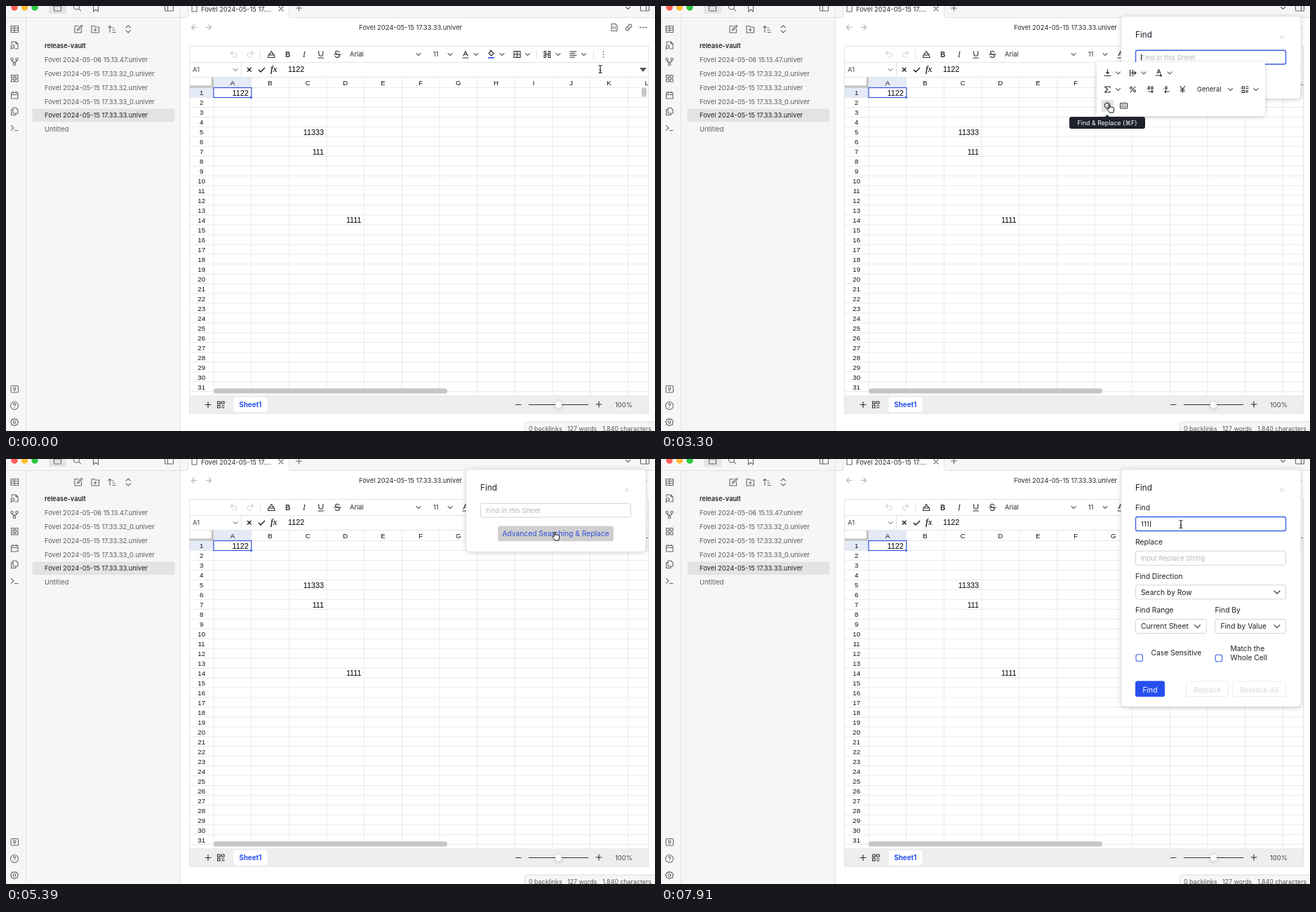
Write an HTML page that moves like this. It is 925 px wide and 606 px high and loops after 8000 ms.

```html
<!DOCTYPE html>
<html lang="en">
<head>
<meta charset="utf-8">
<title>Spreadsheet find and replace</title>
<style>
html, body { margin: 0; width: 100%; height: 100%; overflow: hidden; background: #fff; }
svg { display: block; width: 100%; height: 100%; }
text { font: 9.4px Inter, sans-serif; fill: #2b2b2b; white-space: pre; }
.files text { fill: #5c5c5c; }
.files .on { fill: #222; }
.status text { font-size: 8.9px; fill: #555; }
.sheet text { font: 9.6px "Liberation Sans", Arial, sans-serif; fill: #111; text-anchor: middle; }
.sheet .cell, .formula { font: 10.78px "Liberation Sans", Arial, sans-serif; fill: #000; }
.sheet .cell { text-anchor: end; }
.dialog text { font-size: 10.3px; fill: #1e222b; }
.dialog .title { font-size: 11.76px; }
.dialog .hint, .dialog .typed { font-size: 9.56px; }
.dialog .hint { fill: #b6b8bd; }
.dialog .link { fill: #2f52dc; }
.dialog .off { fill: #dadada; }
.tip text { font-size: 8.82px; fill: #fff; text-anchor: middle; }
.i { fill: none; stroke: #666; stroke-width: 1.1; stroke-linecap: round; stroke-linejoin: round; }
.k { stroke: #2b2b2b; }
.pale { stroke: #c8c8c8; }
.dim { stroke: #d4d4d4; }
.line { fill: none; stroke: #e2e2e2; }
.box { fill: #fff; stroke: #d3d4d8; }
.focus { fill: none; stroke: #3d62ea; stroke-width: 1.4; }
.shadow { filter: drop-shadow(0 1px 3px #0003); }

/* All states hold until the next key; one loop is 8 s. */
.a { animation: 8s step-end infinite; }
#cursor { animation-name: move; }
#hand { animation-name: hand; }
#beam { animation-name: beam; }
#more { animation-name: more; }
#moreTip { animation-name: moreTip; }
#panel { animation-name: panel; }
#findHover { animation-name: findHover; }
#findTip { animation-name: findTip; }
#small { animation-name: small; }
#smallFocus { animation-name: smallFocus; }
#smallCaret { animation-name: smallCaret; }
#linkHover { animation-name: linkHover; }
#full { animation-name: full; }
#fullFocus { animation-name: fullFocus; }
#fullCaret { animation-name: fullCaret; }
#hint { animation-name: hint; }
#ready { animation-name: ready; }
#one { animation-name: one; }
#two { animation-name: two; }
#three { animation-name: ready3; }
@keyframes move {
  0% { transform: translate(847px, 90px); }
  1.87% { transform: translate(872px, 92px); }
  3.75% { transform: translate(885px, 94px); }
  9.37% { transform: translate(881px, 92px); }
  11.25% { transform: translate(873px, 86px); }
  13.12% { transform: translate(864px, 79px); }
  15% { transform: translate(858px, 73px); }
  16.87% { transform: translate(856px, 71.5px); }
  26.25% { transform: translate(846px, 80px); }
  28.12% { transform: translate(812px, 97px); }
  30% { transform: translate(762px, 117px); }
  31.87% { transform: translate(708px, 132px); }
  33.75% { transform: translate(668px, 141px); }
  35.62% { transform: translate(645px, 145px); }
  37.5% { transform: translate(641px, 146px); }
  46.87% { transform: translate(650px, 138px); }
  48.75% { transform: translate(680px, 115px); }
  50.62% { transform: translate(718px, 88px); }
  52.5% { transform: translate(748px, 70px); }
  54.37% { transform: translate(764px, 60px); }
  56.25% { transform: translate(769px, 57px); }
  61.75% { transform: translate(771px, 62px); }
  63.62% { transform: translate(775px, 74px); }
  65.5% { transform: translate(780px, 94px); }
  67.37%, 72.87% { transform: translate(784px, 110px); }
  76.62% { transform: translate(772px, 106px); }
  78.5% { transform: translate(752px, 97px); }
  80.37%, 100% { transform: translate(741px, 93px); }
}
@keyframes hand { 0% { opacity: 0; } 13.12% { opacity: 1; } 63.62% { opacity: 0; } 65.5% { opacity: 1; } 78.5%, 100% { opacity: 0; } }
@keyframes beam { 0% { opacity: 1; } 13.12% { opacity: 0; } 63.62% { opacity: 1; } 65.5% { opacity: 0; } 78.5%, 100% { opacity: 1; } }
@keyframes more { 0% { opacity: 0; } 15% { opacity: 1; } 28.12%, 100% { opacity: 0; } }
@keyframes moreTip { 0% { opacity: 0; } 16.87% { opacity: 1; } 28.12%, 100% { opacity: 0; } }
@keyframes panel { 0% { opacity: 0; } 20.62% { opacity: .6; } 22.5% { opacity: 1; } 56.25% { opacity: .4; } 58%, 100% { opacity: 0; } }
@keyframes findHover { 0% { opacity: 0; } 35.62% { opacity: 1; } 48.75%, 100% { opacity: 0; } }
@keyframes findTip { 0% { opacity: 0; } 37.5% { opacity: 1; } 48.75%, 100% { opacity: 0; } }
@keyframes small { 0% { opacity: 0; } 39.37% { opacity: .6; } 41.25% { opacity: 1; } 71.12%, 100% { opacity: 0; } }
@keyframes smallFocus { 0% { opacity: 1; } 56.25% { opacity: 0; } 63.62% { opacity: 1; } 65.5%, 100% { opacity: 0; } }
@keyframes smallCaret { 0% { opacity: 1; } 46.87% { opacity: 0; } 52.5% { opacity: 1; } 56.25%, 100% { opacity: 0; } }
@keyframes linkHover { 0% { opacity: 0; } 67.37%, 100% { opacity: 1; } }
@keyframes full { 0% { opacity: 0; } 71.12%, 100% { opacity: 1; } }
@keyframes fullFocus { 0% { opacity: 0; } 72.87%, 100% { opacity: 1; } }
@keyframes fullCaret { 0% { opacity: 0; } 72.87% { opacity: 1; } 78.5% { opacity: 0; } 84% { opacity: 1; } 89.62%, 100% { opacity: 0; } }
@keyframes hint { 0% { opacity: 1; } 95.12%, 100% { opacity: 0; } }
@keyframes ready { 0% { opacity: 0; } 95.12%, 100% { opacity: 1; } }
@keyframes one { 0% { opacity: 0; } 95.12% { opacity: 1; } 97%, 100% { opacity: 0; } }
@keyframes two { 0% { opacity: 0; } 97% { opacity: 1; } 98.87%, 100% { opacity: 0; } }
@keyframes ready3 { 0% { opacity: 0; } 98.87%, 100% { opacity: 1; } }
</style>
</head>
<body>
<svg viewBox="0 0 925 606">
<defs>
  <path id="chev" class="i" d="M-3-1.5 0 1.5 3-1.5"/>
  <path id="chevDark" class="i k" stroke-width="1.3" d="M-4-2 0 2 4-2"/>
  <path id="x" class="i" d="M-3-3 3 3M3-3-3 3"/>
  <path id="plus" class="i k" d="M-4 0H4M0-4V4"/>
  <clipPath id="grid"><rect x="262" y="101" width="653" height="454"/></clipPath>
</defs>

<!-- app frame -->
<rect width="925" height="606" fill="#fff"/>
<rect width="249" height="606" fill="#f6f6f6"/>
<rect x="249" width="676" height="16.5" fill="#f6f6f6"/>
<path class="line" d="M0 16.5H257M28.5 17V606M248.5 0V606M406 16.5H925"/>
<path d="M257 16.5q3 0 3-4V-2H403.500V12.500q0 4 3 4V17H257z" fill="#fff"/>
<path class="line" d="M257 16.500q3 0 3-4V-2M403.500-2V12.500q0 4 3 4"/>
<circle cx="12" cy="2" r="4.700" fill="#ff5f57"/>
<circle cx="26.500" cy="2" r="4.700" fill="#febc2e"/>
<circle cx="41" cy="2" r="4.700" fill="#28c840"/>
<rect x="61" y="-8" width="25" height="19" rx="3" fill="#e4e4e4"/>
<path class="i" d="M68.500-2V6q0 1 1 1h8q1 0 1-1V0H68.500M101-2m-4.500 3a4 4 0 1 0 8 0 4 4 0 1 0-8 0M104 4l2.500 3M124.500-2V8l3.500-3 3.500 3V-2M226.500-2V6q0 1 1 1h10q1 0 1-1V-2M230.500-2V7M904.500-2V6q0 1 1 1h10q1 0 1-1V-2M912.500-2V7M265-2V8h7V0l-2-2"/>
<use href="#chev" x="886.500" y="3"/>
<use href="#x" x="392" y="4"/>
<path class="i" d="M413.500 3h8M417.500-1V7"/>
<text x="278" y="7.500">Fovel 2024-05-15 17....</text>

<!-- ribbon -->
<g class="i">
  <path d="M7 28.500h10.500v9H7zM7 31.500h10.500M7 34.500h10.500M12 28.500v9"/>
  <path d="M8 54v-3h6l3 3v7h-4M14 51v3h3"/><circle cx="9.500" cy="58" r="2.300"/><path d="M8 60l-1.500 2"/>
  <circle cx="8.500" cy="76" r="1.700"/><circle cx="15.500" cy="76" r="1.700"/><circle cx="12" cy="83" r="1.700"/><path d="M8.500 78q0 2 3.500 2t3.500-2M12 80v1"/>
  <path d="M7.500 98.500h3.800v3.800H7.500zM13.200 98.500H17v3.800h-3.800zM7.500 104.200h3.800V108H7.500zM13.200 104.200H17V108h-3.800z"/>
  <path d="M7.500 123.500h9.500v8.500H7.500zM7.500 126.500H17M10 121.800v2.500M14.500 121.800v2.500"/>
  <path d="M10 145h4l3 3v5h-7zM10 147.500H7.500v8H14v-2.500"/>
  <path d="M7.500 170.500l3.500 3.300-3.500 3.300M12.500 177.500H17"/>
  <rect x="7" y="541.500" width="10.500" height="9.500" rx="1.500"/><circle cx="12.200" cy="545.500" r="1.700"/><path d="M12.200 547.500v1.500"/>
  <circle cx="12" cy="570" r="5.500"/><path d="M10.300 568.500q.3-1.700 1.900-1.600 1.700.3 1.400 1.800-.2.900-1.600 1.600M12 572.600v.2"/>
  <circle cx="12" cy="593.500" r="1.800"/><path d="M12 588l1.300 1.700 2.300-.6.500 2.200 1.600 1.600-1.200 1.800.1 2.200-2.400.4-2.200 1.500-2-1.500-2.500-.4.100-2.200-1.300-1.700 1.700-1.700.5-2.200 2.200.6z"/>
</g>

<!-- file list -->
<g class="i">
  <path d="M103 28.500h-5v9.500h9.500v-5M101.500 34.800l.4-2 5.500-5.500 1.500 1.500-5.500 5.500z"/>
  <path d="M122 28.500h4l1.200 1.500h5.300v8H122zM127.200 32v4M125.200 34h4"/>
  <path d="M148 37.500v-9M146 30.500l2-2 2 2M152 31h1.500M152 34.200h3M152 37.500h4.500"/>
  <path d="M171 31l3.200-3.200L177.400 31M171 34.800l3.200 3.200 3.200-3.200"/>
</g>
<rect x="37.500" y="146.500" width="203" height="18.800" rx="3" fill="#e3e3e3"/>
<g class="files">
  <text class="on" x="55" y="60.400" font-weight="600" style="font-weight:600;font-size:9.200px">release-vault</text>
  <text x="55" y="80.200">Fovel 2024-05-06 15.13.47.univer</text>
  <text x="55" y="100">Fovel 2024-05-15 17.33.32_0.univer</text>
  <text x="55" y="119.800">Fovel 2024-05-15 17.33.32.univer</text>
  <text x="55" y="139.500">Fovel 2024-05-15 17.33.33_0.univer</text>
  <text class="on" x="55" y="159.300">Fovel 2024-05-15 17.33.33.univer</text>
  <text x="55" y="179">Untitled</text>
</g>

<!-- view header -->
<path class="i" style="stroke:#b4b4b4" d="M272 30.500h-7.500M268 27l-3.500 3.500L268 34M285 30.500h7.500M289 27l3.500 3.500L289 34"/>
<text x="503" y="34">Fovel 2024-05-15 17.33.33.univer</text>
<g class="i">
  <path d="M863 25.500h5.500l2.500 2.500v7.500h-8zM866 29.500l-1.300 1.500 1.300 1.500M868 29.500l1.300 1.500-1.300 1.500"/>
  <path d="M886.500 31.500q1.500 1.500 3 0l2-2q1-2-.5-3t-3 0l-1 1M888.500 29.500q-1.500-1.500-3 0l-2 2q-1 2 .5 3t3 0l1-1"/>
</g>
<path d="M904 30.500h.1M908 30.500h.1M912 30.500h.1" stroke="#555" stroke-width="2" stroke-linecap="round"/>

<!-- toolbar -->
<path class="line" d="M261.500 582V57.500H915.500M261.500 80.500H915.500M261.500 101.500H915.500M335.500 81V101M362.500 63V75M756.500 63V75M837.500 63V75"/>
<g class="i dim"><path d="M320.500 67h5.500q3 .5 3 3t-3 3h-3M323 64.500l-2.500 2.500 2.500 2.500M352.500 67H347q-3 .5-3 3t3 3h3M350 64.500l2.500 2.500-2.500 2.500"/></g>
<path class="i k" d="M374 70l-.5 3.500h9.500l-.5-3.500zM375 70v-2h2v-1.500q1.200-4 2.500 0V68h2v2"/>
<text x="398" y="72.800" style="font-size:11px;font-weight:600">B</text>
<text x="423" y="72.800" style="font:italic 11.500px 'Liberation Serif',serif">I</text>
<path class="i k" d="M445.800 64.500v4q.3 2.700 3 2.700t3-2.700v-4M445 74h7.500"/>
<path class="i k" d="M475 66q-1-1.800-2.800-1.700-2.700.2-2.700 2t2.500 2.300q3.300.5 3.300 2.600t-3 2.200q-2.400 0-3-1.800M467.500 69H477.500"/>
<text x="490" y="72.300">Arial</text><text x="608.800" y="72.300">11</text>
<use href="#chev" x="588" y="69"/><use href="#chev" x="633" y="69"/><use href="#chev" x="670" y="69"/><use href="#chev" x="707" y="69"/><use href="#chev" x="743.500" y="69"/><use href="#chev" x="787" y="69"/><use href="#chev" x="823.500" y="69"/>
<path class="i k" d="M652 71l3-6.500 3 6.500M653 69h4M651 74h8"/>
<path class="i k" d="M688 67.500l3.500-3.500 3.500 3.500-3.500 3.500zM691.500 64l-1.500-1"/><path d="M687 73.800h9" stroke="#274fee" stroke-width="1.600"/>
<path class="i k" d="M724 64.500h9v9h-9zM724 69h9M728.500 64.500v9M769.500 64.500h-2.500v3.500h2.500zM773 64.500h2.800v3.500H773zM767 70h2.500v3.500H767zM773 70h2.800v3.500H773zM769.500 69h3.500M804 65h9M804 67.700h6.500M804 70.300h9M804 73h6.500"/>
<path d="M851.500 65v.1M851.500 69v.1M851.500 73v.1" stroke="#333" stroke-width="1.600" stroke-linecap="round"/>
<g id="more" class="a" opacity="0">
  <rect x="843" y="60" width="18" height="18" rx="3" fill="#e4e4e4"/>
  <path d="M851.500 65v.1M851.500 69v.1M851.500 73v.1" stroke="#333" stroke-width="1.600" stroke-linecap="round"/>
</g>

<!-- formula bar -->
<text x="266" y="94.300" style="fill:#444">A1</text>
<use href="#chevDark" transform="translate(327 91) scale(.75)"/>
<path d="M344 88l5.500 5.500M349.500 88l-5.500 5.500M360 91l3 3 6-6" fill="none" stroke="#111" stroke-width="1.300"/>
<text x="377" y="94.300" style="font:italic 600 11.500px 'Liberation Serif',serif">fx</text>
<text class="formula" x="402" y="94.300">1122</text>
<path d="M903 88h10l-5 6z" fill="#555"/>

<!-- cells -->
<g class="sheet" clip-path="url(#grid)">
  <path d="M296 101.500h53.700V116H296zM262 116.500h33.800v14H262z" fill="#e4eaf6"/>
  <path id="lines" fill="none" stroke="#e4e5e8" stroke-width=".8"/>
  <path d="M292.800 102h3v14.500H262V113.500h30.800z" fill="#c2c2c2"/>
  <g id="heads"></g>
  <text class="cell" x="345.700" y="127.700">1122</text>
  <text class="cell" x="453" y="183.600">11333</text>
  <text class="cell" x="453" y="211.600">111</text>
  <text class="cell" x="506.500" y="309.400">1111</text>
  <rect x="295.900" y="116.500" width="53.900" height="14" fill="none" stroke="#3055dc" stroke-width="1.200"/>
  <rect x="347.500" y="128.500" width="3.500" height="3.500" fill="#3055dc" stroke="#fff" stroke-width=".5"/>
</g>
<rect x="296" y="545.300" width="333" height="7.200" rx="3.600" fill="#c6c6c6"/>
<rect x="906" y="116.500" width="7" height="13" rx="3.500" fill="#c6c6c6"/>
<path class="line" d="M915.500 57V582"/>

<!-- sheet bar -->
<rect x="262" y="555" width="653" height="27" fill="#eeeeef"/>
<use href="#plus" x="288" y="568.500"/>
<path class="i k" d="M301.500 564h3.500v3.500h-3.500zM301.500 569.500h3.500v3.500h-3.500zM307 564h4v3h-4zM307.500 570h3.500M307.500 572.800h3.500"/>
<rect x="324.500" y="558" width="48" height="21" rx="3" fill="#fff"/>
<text x="348.300" y="572" text-anchor="middle" style="font-size:9.800px;font-weight:700;fill:#274fee">Sheet1</text>
<path d="M726 568.500h8.500M745 568.500h85" stroke="#333"/>
<circle class="shadow" cx="787.500" cy="568.500" r="4.500" fill="#fff"/>
<use href="#plus" x="845" y="568"/>
<text x="868" y="571.500" style="fill:#444">100%</text>

<!-- status -->
<path d="M739.500 607V596q0-3 3-3H926V607z" fill="#f6f6f6" stroke="#dcdcdc"/>
<g class="status"><text x="745" y="606">0 backlinks</text><text x="800" y="606">127 words</text><text x="850" y="606">1,840 characters</text></g>

<!-- find dialog, short -->
<g id="small" class="dialog a" opacity="0">
  <rect class="shadow" x="656" y="15" width="256" height="117" rx="5" fill="#fff" stroke="#ececec"/>
  <text class="title" x="676" y="44.700">Find</text>
  <use href="#x" transform="translate(885 44) scale(.8)" opacity=".3"/>
  <rect class="box" x="676.500" y="63.300" width="214" height="19.700" rx="2.500"/>
  <rect id="smallFocus" class="focus a" x="676.500" y="63.300" width="214" height="19.700" rx="2.500"/>
  <text class="hint" x="684" y="76.600">Find in this Sheet</text>
  <path id="smallCaret" class="a" d="M684.500 68.500v9" stroke="#222"/>
  <rect id="linkHover" class="a" x="701" y="95.500" width="165" height="21.700" rx="3" fill="#cfcfcf" opacity="0"/>
  <text class="link" x="783.500" y="110.200" text-anchor="middle">Advanced Searching &amp; Replace</text>
</g>

<!-- find dialog, long -->
<g id="full" class="dialog a" opacity="0">
  <rect class="shadow" x="656" y="15" width="256" height="338" rx="5" fill="#fff" stroke="#ececec"/>
  <text class="title" x="676" y="44.700">Find</text>
  <use href="#x" transform="translate(885 44) scale(.8)" opacity=".3"/>
  <text x="676" y="73.300">Find</text>
  <text x="676" y="122">Replace</text>
  <text x="676" y="170.700">Find Direction</text>
  <text x="676" y="219.300">Find Range</text>
  <text x="789.500" y="219.300">Find By</text>
  <g class="box">
    <rect x="676.500" y="82.500" width="214" height="20" rx="2.500"/>
    <rect x="676.500" y="131.300" width="214" height="20" rx="2.500"/>
    <rect x="676.500" y="179.800" width="214" height="20" rx="2.500"/>
    <rect x="676.500" y="228.500" width="101" height="20" rx="2.500"/>
    <rect x="789.500" y="228.500" width="101" height="20" rx="2.500"/>
  </g>
  <rect id="fullFocus" class="focus a" x="676.500" y="82.500" width="214" height="20" rx="2.500"/>
  <text id="hint" class="hint a" x="684" y="96">Find in this Sheet</text>
  <path id="fullCaret" class="a" d="M684.500 88v8.500" stroke="#222"/>
  <g id="one" class="a"><text class="typed" x="684" y="96">1</text><path d="M688.700 88v9" stroke="#222"/></g>
  <g id="two" class="a"><text class="typed" x="684" y="96">11</text><path d="M693.200 88v9" stroke="#222"/></g>
  <g id="three" class="a"><text class="typed" x="684" y="96">111</text><path d="M697.700 88v9" stroke="#222"/></g>
  <text class="hint" x="684" y="144.700">Input Replace String</text>
  <text x="684" y="193.500">Search by Row</text>
  <text x="684" y="242.200">Current Sheet</text>
  <text x="797.500" y="242.200">Find by Value</text>
  <use href="#chevDark" x="878" y="190"/><use href="#chevDark" x="764.500" y="238.700"/><use href="#chevDark" x="878" y="238.700"/>
  <rect x="677" y="278.800" width="9.500" height="9.500" rx="2.300" class="focus" style="stroke-width:1.100"/>
  <rect x="790.200" y="279.300" width="9.500" height="9.500" rx="2.300" class="focus" style="stroke-width:1.100"/>
  <text x="698.500" y="279.500">Case Sensitive</text>
  <text x="811.500" y="273.700">Match the</text>
  <text x="811.500" y="287.300">Whole Cell</text>
  <g class="box" style="stroke:#ececec">
    <rect x="676.500" y="317" width="41" height="21.500" rx="2.500"/>
    <rect x="748.500" y="317" width="60" height="21.500" rx="2.500"/>
    <rect x="814.500" y="317" width="76" height="21.500" rx="2.500"/>
  </g>
  <g text-anchor="middle">
    <text class="off" x="697" y="332.500">Find</text>
    <text class="off" x="778.500" y="332.500">Replace</text>
    <text class="off" x="852.500" y="332.500">Replace All</text>
    <g id="ready" class="a">
      <rect x="676" y="316.500" width="42" height="22.500" rx="3" fill="#274fee"/>
      <text x="697" y="332.500" style="fill:#fff">Find</text>
    </g>
  </g>
</g>

<!-- overflow tools -->
<g id="panel" class="a" opacity="0">
  <rect class="shadow" x="621" y="80.500" width="240" height="76.500" rx="3" fill="#fff"/>
  <rect x="621" y="80" width="240" height="5" fill="#fff"/>
  <rect id="findHover" class="a" x="628" y="134" width="17" height="17" rx="3" fill="#e2e2e2"/>
  <g class="i k">
    <path d="M632 99.500h9M636.500 90.500v6M634.500 94.500l2 2 2-2"/>
    <path d="M668.500 91v9M672.500 91v9M670 95.500h7M675 93.500l2 2-2 2"/>
    <path d="M707 96l2.500-5.500L712 96M707.800 94.500h3.400M705.500 99h8M712 97.500l1.500 1.500-1.500 1.500"/>
    <path d="M640 116.500v-1.500h-7.500l4 4-4 4h7.500V121.500"/>
    <circle cx="670" cy="116.700" r="1.500"/><circle cx="675" cy="121.200" r="1.500"/><path d="M676 115l-7 8"/>
    <path d="M693 118h.1M694.500 115h2v3.500h-2zM699 115h2v3.500h-2zM695 122h6M699.500 120.500l1.500 1.500-1.500 1.500"/>
    <path d="M716.500 118h.1M719 115h2v3.500h-2zM724 122h-6M719.500 120.500L718 122l1.500 1.500"/>
    <path d="M740 114.500l3.300 4 3.300-4M743.300 118.500v5M740.300 119h6M740.300 121.300h6"/>
    <path d="M828 115h3.500v3H828zM828 120.500h3.500v3H828zM834 115h3M834 117.500h3M833.500 120.500l3 3M836.500 120.500l-3 3"/>
    <circle cx="636" cy="141.800" r="3.700"/><path d="M639 144.500l2 2"/>
    <rect x="654.500" y="138.500" width="10" height="7.500" rx="1"/><path d="M656.500 141h6M656.500 143.500h6" stroke-dasharray="1 1.300"/>
  </g>
  <text x="764" y="122.300">General</text>
  <use href="#chev" x="651.500" y="95.500"/><use href="#chev" x="688" y="95.500"/><use href="#chev" x="725" y="95.500"/>
  <use href="#chev" x="651.500" y="119"/><use href="#chev" x="811.500" y="119"/><use href="#chev" x="848" y="119"/>
</g>

<!-- tooltips -->
<g id="moreTip" class="tip a" opacity="0">
  <path d="M848 84.500l3.500-3.500 3.500 3.500z" fill="#1e222b"/>
  <rect x="829.500" y="84" width="44.500" height="17.500" rx="3" fill="#1e222b"/>
  <text x="851.700" y="96">More</text>
</g>
<g id="findTip" class="tip a" opacity="0">
  <path d="M632.500 158.500l3.500-3.500 3.500 3.500z" fill="#1e222b"/>
  <rect x="582" y="158" width="108" height="17" rx="3" fill="#1e222b"/>
  <text x="636" y="169.700">Find &amp; Replace (⌘F)</text>
</g>

<!-- pointer -->
<g id="cursor" class="a">
  <path id="hand" class="a" opacity="0" fill="#fff" stroke="#111" stroke-linejoin="round" d="M-3.200-5c0-1.200 1.900-1.200 1.900 0v3.600c.2-1.300 1.900-1.200 2 0 .4-1 1.900-.8 2 .3.500-.8 1.900-.5 1.900.7V2c0 1.600-.8 2.300-.9 4h-5.400C-2.300 4.300-4 3-5 1.300c-.7-1.200.7-1.900 1.500-1.100l.8.800z"/>
  <g id="beam" class="a" fill="none">
    <path d="M-2.500-5.500Q-.3-5.500 0-4.300.3-5.500 2.500-5.500M0-4.500v9M-2.500 5.500Q-.3 5.500 0 4.300.3 5.500 2.500 5.500M-1.300 1.500h2.600" stroke="#fff" stroke-width="2.400"/>
    <path d="M-2.500-5.500Q-.3-5.500 0-4.300.3-5.500 2.500-5.500M0-4.500v9M-2.500 5.500Q-.3 5.500 0 4.300.3 5.500 2.500 5.500M-1.300 1.500h2.600" stroke="#111" stroke-width="1.100"/>
  </g>
</g>
</svg>
<script>
const left = 296, top0 = 116.5, colW = 53.66, rowH = 13.97;
const heads = document.getElementById("heads");

function label(text, x, y) {
  const el = document.createElementNS("http://www.w3.org/2000/svg", "text");
  el.setAttribute("x", x);
  el.setAttribute("y", y);
  el.textContent = text;
  heads.append(el);
}

let d = `M262 ${top0}H915`;
for (let c = 0; c < 12; c++) {
  d += `M${left + c * colW} 101V555`;
  label("ABCDEFGHIJKL"[c], left + (c + 0.5) * colW, 113);
}
for (let r = 1; r <= 32; r++) {
  d += `M262 ${top0 + r * rowH}H915`;
  label(r, 278.7, top0 + (r - 0.5) * rowH + 4);
}
document.getElementById("lines").setAttribute("d", d);
</script>
</body>
</html>
```
